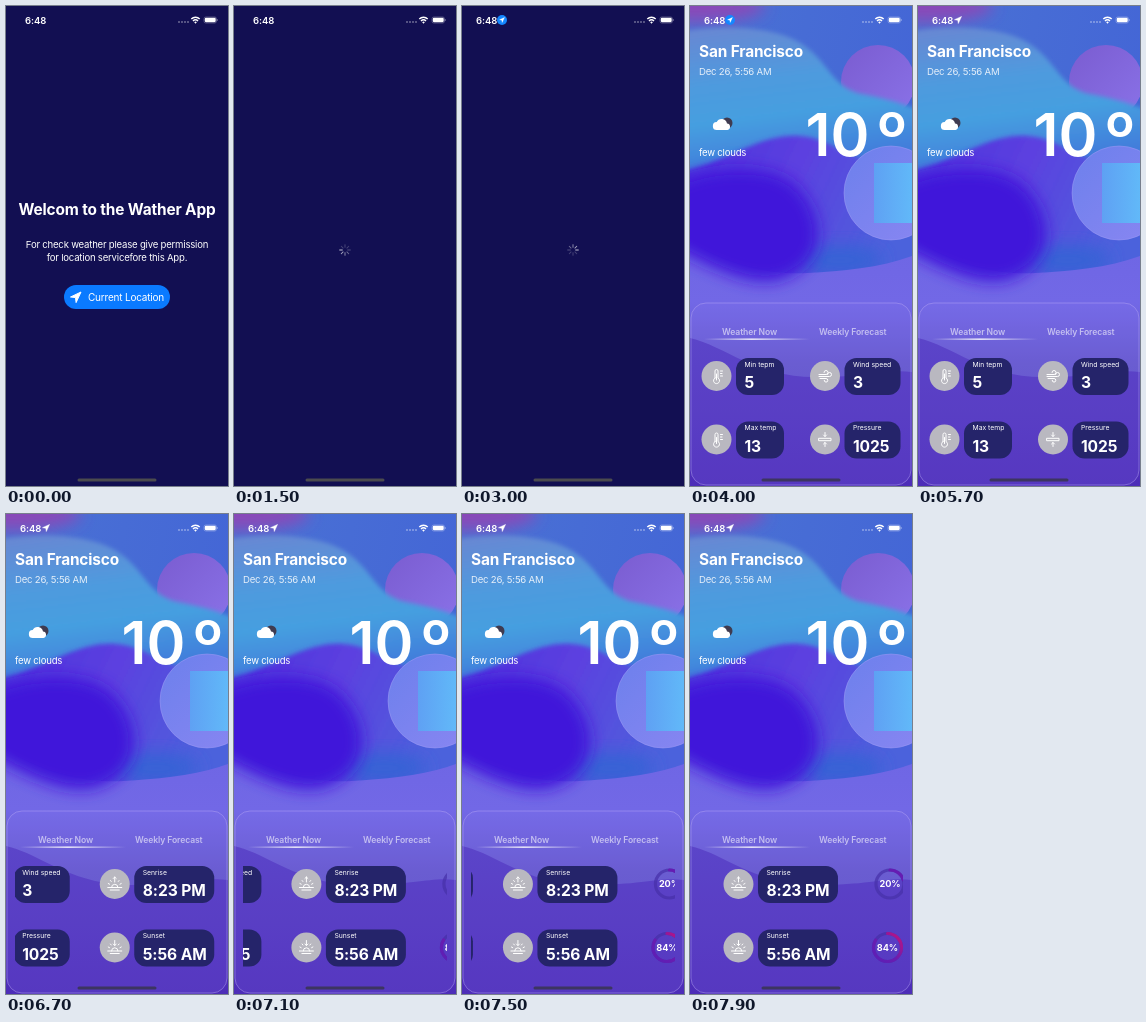
An HTML page for the animation above (8000 ms loop, 222 by 480 pixels).

```html
<!DOCTYPE html>
<html lang="en">
<head>
<meta charset="utf-8">
<title>Weather app</title>
<style>
  html, body { margin: 0; width: 100%; height: 100%; overflow: hidden; background: #120f52; }
  svg { display: block; width: 100vw; height: 100vh; }
  text { font-family: Inter, "Liberation Sans", sans-serif; fill: #fff; }
  .title { font-size: 15.4px; font-weight: 700; letter-spacing: -.15px; }
  .body { font-size: 9.6px; letter-spacing: -.22px; }
  .clock { font-size: 9.5px; font-weight: 600; letter-spacing: -.1px; }
  .temp { font-size: 59px; font-weight: 600; }
  .tab { font-size: 8.6px; font-weight: 600; letter-spacing: -.1px; opacity: .58; }
  .label { font-size: 6.8px; }
  .value { font-size: 15.6px; font-weight: 700; letter-spacing: -.1px; }
  .percent { font-size: 9.2px; font-weight: 700; letter-spacing: -.1px; }
  .mid { text-anchor: middle; }
  .line { fill: none; stroke: #fff; stroke-width: 1; stroke-linecap: round; stroke-linejoin: round; }
</style>
</head>
<body>
<svg viewBox="0 0 222 480">
  <defs>
    <linearGradient id="sky" x2="1" y2=".3">
      <stop offset="0" stop-color="#4a72d4"/>
      <stop offset="1" stop-color="#4466d6"/>
    </linearGradient>
    <linearGradient id="violet" x2="1" y2="1">
      <stop offset="0" stop-color="#7a5cd0"/>
      <stop offset="1" stop-color="#8a72e8"/>
    </linearGradient>
    <linearGradient id="cyan" x2=".15" y2="1">
      <stop offset="0" stop-color="#6a86d2"/>
      <stop offset=".3" stop-color="#4f9ade"/>
      <stop offset=".5" stop-color="#459fe0"/>
      <stop offset=".8" stop-color="#4276da"/>
      <stop offset="1" stop-color="#4a68da"/>
    </linearGradient>
    <linearGradient id="indigo" x2="1" y2=".3">
      <stop offset="0" stop-color="#4a30dc"/>
      <stop offset=".5" stop-color="#5c40e0"/>
      <stop offset="1" stop-color="#4c62dc"/>
    </linearGradient>
    <linearGradient id="orb" x2="1" y2="1">
      <stop offset="0" stop-color="#6c80ec"/>
      <stop offset="1" stop-color="#8a86f2"/>
    </linearGradient>
    <linearGradient id="glass">
      <stop offset="0" stop-color="#5aa6f4"/>
      <stop offset="1" stop-color="#5cc2fa"/>
    </linearGradient>
    <linearGradient id="haze" x2="0" y2="1">
      <stop offset="0" stop-color="#6e66e4"/>
      <stop offset=".25" stop-color="#7268e6"/>
      <stop offset=".5" stop-color="#6458cc"/>
      <stop offset="1" stop-color="#5a48c4"/>
    </linearGradient>
    <linearGradient id="deep" x2="0" y2="1">
      <stop offset="0" stop-color="#533cc2"/>
      <stop offset="1" stop-color="#4d2db8"/>
    </linearGradient>
    <linearGradient id="underline" gradientUnits="userSpaceOnUse" x1="14" x2="120">
      <stop offset="0" stop-color="#fff" stop-opacity="0"/>
      <stop offset=".45" stop-color="#fff"/>
      <stop offset="1" stop-color="#fff" stop-opacity="0"/>
    </linearGradient>
    <linearGradient id="progress" x2="1" y2="1">
      <stop offset="0" stop-color="#5a1fb8"/>
      <stop offset=".45" stop-color="#6a1cb0"/>
      <stop offset="1" stop-color="#c4127c"/>
    </linearGradient>
    <filter id="soft" x="-40%" y="-40%" width="180%" height="180%"><feGaussianBlur stdDeviation="8"/></filter>
    <filter id="hazy" x="-20%" y="-20%" width="140%" height="140%"><feGaussianBlur stdDeviation="2"/></filter>
    <clipPath id="viewport"><rect x="9" y="340" width="204" height="125"/></clipPath>
  </defs>

  <rect width="222" height="480" fill="#120f52"/>

  <g id="welcome">
    <text class="title mid" x="111" y="209">Welcom to the Wather App</text>
    <text class="body mid" x="111" y="241.5">For check weather please give permission</text>
    <text class="body mid" x="111" y="254.5">for location servicefore this App.</text>
    <rect x="58" y="279" width="106" height="24" rx="12" fill="#0a7aff"/>
    <path d="M75 286L64.5 291l5 .6.6 5z" fill="#fff" stroke="#fff" stroke-linejoin="round"/>
    <text x="82" y="294.5" style="font-size:10px;letter-spacing:-.2px">Current Location</text>
  </g>

  <g id="spinner" transform="translate(111 244)"></g>

  <g id="weather">
    <rect width="222" height="300" fill="url(#sky)"/>
    <ellipse cx="5" cy="0" rx="70" ry="16" fill="#8a48b8" filter="url(#soft)"/>
    <circle cx="188" cy="76" r="37" fill="url(#violet)"/>
    <path d="M-8 26C30 18 85 20 112 38S142 82 172 88S212 98 230 104V215H-8z" fill="url(#cyan)" filter="url(#hazy)"/>
    <path d="M-8 166C45 152 72 127 110 130S165 165 230 160V280H-8z" fill="url(#indigo)" filter="url(#hazy)"/>
    <ellipse cx="150" cy="254" rx="42" ry="16" fill="#3862d6" filter="url(#soft)"/>
    <path d="M0 235C40 262 85 269 118 267S190 262 222 250V480H0z" fill="url(#haze)"/>
    <path d="M-20 178C30 158 70 160 95 172S145 235 112 262S40 272-20 240z" fill="#4014da" filter="url(#soft)"/>
    <circle cx="201" cy="187" r="47" fill="url(#orb)" stroke="#a09cf6" stroke-opacity=".5"/>
    <rect x="184" y="157" width="38" height="60" fill="url(#glass)" opacity=".85"/>
    <path d="M0 332C35 340 65 371 125 371S195 363 222 366V480H0z" fill="url(#deep)"/>
    <rect x="1" y="297" width="220" height="182" rx="15" fill="#8f7cf0" fill-opacity=".14" stroke="#b8a8f4" stroke-opacity=".45"/>

    <text class="title" x="9" y="51">San Francisco</text>
    <text class="body" x="9" y="69" opacity=".85">Dec 26, 5:56 AM</text>
    <circle cx="37" cy="117" r="5.5" fill="#3f3b50"/>
    <path d="M27 124a4 4 0 0 1-.3-8 5.5 5.5 0 0 1 10.3 1.5 3.3 3.3 0 0 1 .5 6.5z" fill="#fff"/>
    <text class="body" x="9" y="150">few clouds</text>
    <text class="temp" x="115.5" y="150">10</text>
    <text class="temp mid" x="202" y="150">º</text>

    <text class="tab" x="32" y="329">Weather Now</text>
    <text class="tab" x="129" y="329">Weekly Forecast</text>
    <rect x="14" y="332.5" width="106" height="1.3" fill="url(#underline)"/>
    <g clip-path="url(#viewport)"><g id="cards"></g></g>
  </g>

  <g id="status">
    <text id="clock" class="clock" y="17.5">6:48</text>
    <circle id="badge" cx="40" cy="14" r="5" fill="#1487ff"/>
    <path id="arrow" d="M3.5-3.5L-3.5-.3l3.3.5.5 3.3z" fill="#fff" stroke="#fff" stroke-width=".5" stroke-linejoin="round"/>
    <g fill="#fff" opacity=".38">
      <circle cx="173" cy="16" r="1"/><circle cx="176" cy="16" r="1"/>
      <circle cx="179" cy="16" r="1"/><circle cx="182" cy="16" r="1"/>
    </g>
    <path class="line" style="stroke-width:1.5;stroke-linecap:butt" d="M185.300 13a6 6 0 0 1 8.400 0M187 15a3.600 3.600 0 0 1 5 0"/>
    <path d="M188.2 16.2a1.9 1.9 0 0 1 2.6 0l-1.3 1.5z" fill="#fff"/>
    <rect x="198" y="11" width="12.5" height="6" rx="1.8" fill="none" stroke="#fff" stroke-opacity=".45" stroke-width=".6"/>
    <rect x="198.8" y="11.8" width="10.9" height="4.4" rx="1.1" fill="#fff"/>
    <path d="M211.3 13v2" stroke="#fff" stroke-opacity=".5" stroke-width=".7"/>
  </g>
  <rect id="home" x="71.5" y="472.5" width="79" height="3" rx="1.5"/>
</svg>

<script>
const LOOP = 8000;
const TIMES = { loading: 1500, badge: 1800, spinnerStop: 3700, weather: 4000, plainArrow: 5500 };
const $ = id => document.getElementById(id);
const show = (id, on) => $(id).setAttribute("display", on ? "inline" : "none");

const sun = "M-7 3.500h14M-3.200 3.500a3.200 3.200 0 0 1 6.400 0M-6.500-.5l1.300.7M6.500-.5l-1.300.7M-4.300-3.500l.8 1M4.300-3.500l-.8 1M-4.500 6h9";
const thermometer = "M-1.500 2V-5a1.500 1.500 0 0 1 3 0V2a3 3 0 1 1-3 0zM0-2v6M4-5h2M4-2.500h1.500M4 0h2";
const icons = {
  low: thermometer,
  high: thermometer,
  wind: "M-6-1.500h7a2 2 0 1 0-2-2M-6 .5h10.500a2 2 0 1 0-2-2M-5 2.500h6a1.800 1.800 0 1 1-1.800 1.800",
  pressure: "M-6-1.200h12v2.400h-12zM0-7v4M-1.500-4.500L0-3l1.500-1.500M0 7V3M-1.500 4.500L0 3l1.500 1.500",
  sunrise: sun + "M0-2v-5M-1.500-5.500L0-7l1.500 1.500",
  sunset: sun + "M0-7v5M-1.500-3.500L0-2l1.500-1.500"
};

function card(x, width, y, icon, label, value) {
  const iconX = x - 19.5;
  return `<circle cx="${iconX}" cy="${y}" r="15" fill="#b9b8c0"/>
    <path class="line" transform="translate(${iconX} ${y})" d="${icons[icon]}"/>
    <rect x="${x}" y="${y - 18}" width="${width}" height="37" rx="12" fill="#25246a"/>
    <text class="label" x="${x + 8.5}" y="${y - 9.5}">${label}</text>
    <text class="value" x="${x + 8.5}" y="${y + 12}">${value}</text>`;
}

function ring(x, y, r, percent) {
  return `<circle cx="${x}" cy="${y}" r="${r}" fill="none" stroke="#4630a8" stroke-opacity=".7" stroke-width="3.2"/>
    <circle cx="${x}" cy="${y}" r="${r}" fill="none" stroke="${percent < 50 ? "#661cb2" : "url(#progress)"}"
      stroke-width="3.2" stroke-linecap="round" pathLength="100" stroke-dasharray="${percent} 100" transform="rotate(-90 ${x} ${y})"/>
    <text class="percent mid" x="${x}" y="${y + 3.3}">${percent}%</text>`;
}

$("cards").innerHTML =
  card(46, 48, 370, "low", "Min tepm", "5") +
  card(46, 48, 433.5, "high", "Max temp", "13") +
  card(154.5, 56, 370, "wind", "Wind speed", "3") +
  card(154.5, 56, 433.5, "pressure", "Pressure", "1025") +
  card(275, 80, 370, "sunrise", "Senrise", "8:23 PM") +
  card(275, 80, 433.5, "sunset", "Sunset", "5:56 AM") +
  ring(407, 370, 14, 20) + ring(404.5, 433.5, 14, 84);

const blades = Array.from({ length: 8 }, (_, i) => {
  const blade = document.createElementNS("http://www.w3.org/2000/svg", "path");
  blade.setAttribute("d", "M0-2.700V-5.300");
  blade.setAttribute("class", "line");
  blade.setAttribute("transform", `rotate(${i * 45})`);
  $("spinner").append(blade);
  return blade;
});

// A finger flick: steady acceleration until release, then exponential deceleration.
const flick = { release: 6200, at: 34, end: 213.2, tau: 505 };
flick.speed = (flick.end - flick.at) / flick.tau;
flick.duration = 2 * flick.at / flick.speed;

function scrollAt(t) {
  const since = t - flick.release;
  if (since >= 0) return flick.end - (flick.end - flick.at) * Math.exp(-since / flick.tau);
  return flick.at * Math.max(0, 1 + since / flick.duration) ** 2;
}

function render(t) {
  const onWeather = t >= TIMES.weather;
  const located = t >= TIMES.badge;
  show("welcome", t < TIMES.loading);
  show("spinner", t >= TIMES.loading && !onWeather);
  show("weather", onWeather);
  show("badge", located && t < TIMES.plainArrow);
  show("arrow", located);
  $("clock").setAttribute("x", located ? 14 : 19);
  $("arrow").setAttribute("transform", `translate(40 14) scale(${t < TIMES.plainArrow ? .7 : 1})`);
  $("home").setAttribute("fill", onWeather ? "#3c3560" : "#4b4b4e");

  const head = Math.floor(Math.min(t, TIMES.spinnerStop) / 125) + 2;
  blades.forEach((blade, i) => {
    const age = (head - i + 8) % 8;
    blade.setAttribute("stroke-opacity", Math.max(.22, .75 - age * .12));
  });
  $("cards").setAttribute("transform", `translate(${-scrollAt(t)} 0)`);
}

const start = performance.now();
function tick() {
  render((performance.now() - start) % LOOP);
  requestAnimationFrame(tick);
}
tick();
</script>
</body>
</html>
```
